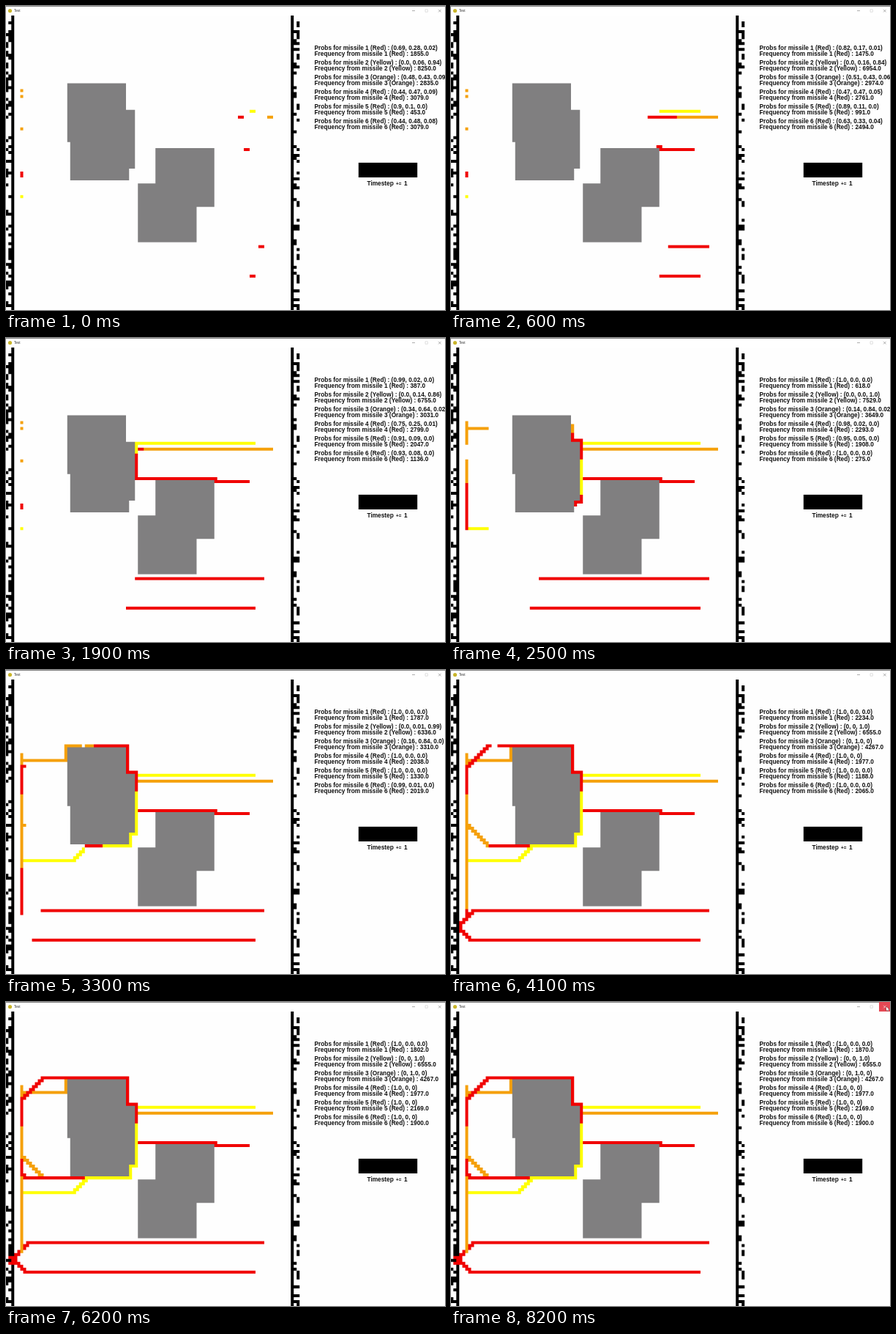
Animation, 600 px wide and 415 px high, one loop 8300 ms. Source, as an HTML page with a canvas:

```html
<!DOCTYPE html>
<html lang="en">
<head>
<meta charset="utf-8">
<title>Test</title>
<style>
html, body { margin: 0; width: 100%; height: 100%; overflow: hidden; background: #fff; }
canvas { display: block; }
</style>
</head>
<body>
<canvas id="stage" width="600" height="415"></canvas>
<script>
const ctx = document.getElementById('stage').getContext('2d');
const RED = '#f00000', YELLOW = '#ffff00', ORANGE = '#f5a00a', PAPER = '#fefefe';
const LOOP = 8300;

// The board is painted enlarged, then scaled down for soft edges without seams.
const ZOOM = 4;
const board = document.createElement('canvas');
board.width = 600 * ZOOM;
board.height = 415 * ZOOM;
const bctx = board.getContext('2d');

// Moves are letter groups with a repeat count; S stays in place.
const DIRS = { L: [-1, 0], R: [1, 0], U: [0, -1], D: [0, 1], S: [0, 0] };
function path(color, col, row, moves) {
  const cells = [[col, row]];
  for (const [, group, count] of moves.matchAll(/([A-Z]+)(\d+)/g))
    for (const step of group.repeat(count)) {
      col += DIRS[step][0];
      row += DIRS[step][1];
      cells.push([col, row]);
    }
  return { color, cells };
}

const interceptors = [
  path(RED, 5, 53, 'U24 R1 UR7'),
  path(ORANGE, 5, 25, 'D24 R1 DR7'),
  path(ORANGE, 5, 27, 'R15 U5 R5'),
  path(RED, 5, 54, 'D27'),
  path(ORANGE, 5, 38, 'D43'),
  path(YELLOW, 5, 61, 'R18 UR4 U1 R2'),
];
const missiles = [
  path(RED, 80, 34, 'L36 D18 L2 D4 L36 U1 L1 U5'),
  path(YELLOW, 84, 32, 'L40 D20 L2 D4 L12'),
  path(ORANGE, 90, 34, 'L46 U3 L3 U9 L15'),
  path(RED, 82, 45, 'L11 U1 L27 U13 L3 U9 L27'),
  path(RED, 87, 78, 'L80 DL4 D1 S7 D1 L1 D1 L1'),
  path(RED, 84, 88, 'L78 UL3 U1 S12 L1 U1 L1'),
];
const LAUNCH = 50, LAST = 105;

const blocks = [[21, 23], [24, 32], [22, 36], [51, 45], [45, 57]];

// Readouts at KEYS: frequency, plus the first two probabilities at the first four.
const KEYS = [0, 13, 25, 33, 41, 62, 82];
const readouts = [
  { name: 'Red', end: 99, freq: [1855, 855, 618, 1787, 2234, 1802, 1870],
    a: [.694, .97, 1, 1], b: [.284, .03, 0, 0], hit: [1, 0, 0] },
  { name: 'Yellow', end: 36, freq: [8250, 5559, 7529, 6336, 6555],
    a: [0, 0, 0, 0], b: [.06, .28, 0, .01], hit: [0, 0, 1] },
  { name: 'Orange', end: 34, freq: [2835, 2844, 3649, 3310, 4267],
    a: [.48, .54, .14, .16], b: [.43, .44, .84, .84], hit: [0, 1, 0] },
  { name: 'Red', end: 41, freq: [3079, 2964, 2293, 2038, 1977],
    a: [.44, .51, .98, 1], b: [.47, .48, .02, 0], hit: [1, 0, 0] },
  { name: 'Red', end: 50, freq: [453, 1913, 1908, 1330, 1188, 2169],
    a: [.9, .87, .95, 1], b: [.1, .13, .05, 0], hit: [1, 0, 0] },
  { name: 'Red', end: 50, freq: [3079, 2111, 275, 2019, 2065, 1900],
    a: [.44, .85, 1, .99], b: [.48, .15, 0, .01], hit: [1, 0, 0] },
];
const LATE_TICKS = [55, 57, 58, 59, 62, 63, 65, 68, 70, 72, 74, 75, 76, 78, 80, 81, 82];

const X = col => Math.round((col * 4.02 - 0.7) * ZOOM);
const Y = row => Math.round((13 + row * 4.02) * ZOOM);

function rand(n) {
  let h = Math.imul(n + 1, 0x9E3779B1);
  h = Math.imul(h ^ (h >>> 15), 0x85EBCA6B);
  h ^= h >>> 13;
  return (h >>> 0) / 4294967296;
}

function cells(color, col, row, w = 1, h = 1) {
  bctx.fillStyle = color;
  bctx.fillRect(X(col), Y(row), X(col + w) - X(col), Y(row + h) - Y(row));
}

function text(str, x, y, size, weight = 'bold') {
  ctx.font = `${weight} ${size}px "Liberation Sans", Arial, sans-serif`;
  ctx.fillText(str, x, y);
}

function stepsAt(tick) {
  if (tick <= 33) return Math.max(2, Math.floor(1.2 + 2.275 * tick));
  return Math.min(LAST, 76 + Math.floor((tick - 33) * 1.75));
}

function drawWalls() {
  cells('#000', 2, 0, 1, 101);
  cells('#000', 97, 0, 1, 101);
  for (let row = 0; row < 100; row++)
    [0, 1, 98, 99].forEach((col, i) => {
      if (rand(row * 4 + i) < 0.36) cells('#000', col, row);
    });
}

function drawTrails(steps) {
  const mark = ({ color, cells: list }, i) => {
    if (i < list.length) cells(color, ...list[i]);
  };
  for (let s = 1; s <= steps; s++) {
    for (const p of interceptors) mark(p, Math.max(0, s - LAUNCH - 1));
    for (const p of missiles) mark(p, s - 1);
  }
}

function drawBoard(steps) {
  bctx.fillStyle = PAPER;
  bctx.fillRect(0, 0, board.width, board.height);
  drawWalls();
  for (const [col, row] of blocks) cells('#807f80', col, row, 20, 20);
  drawTrails(steps);
  ctx.imageSmoothingQuality = 'high';
  ctx.drawImage(board, 0, 0, 600, 415);
}

const decimal = v => {
  const r = Math.round(v * 100) / 100;
  return Number.isInteger(r) ? r.toFixed(1) : String(r);
};

function readout(m, id, tick) {
  const lastFreq = m.freq[m.freq.length - 1];
  if (tick >= m.end) return [m.hit.map(v => v ? '1.0' : '0').join(', '), lastFreq];
  let k = 0;
  while (k < KEYS.length - 2 && tick >= KEYS[k + 1]) k++;
  const u = (tick - KEYS[k]) / (KEYS[k + 1] - KEYS[k]);
  const mix = (list, end) => {
    const from = list[k] ?? end, to = list[k + 1] ?? end;
    return from + (to - from) * u;
  };
  const a = mix(m.a, m.hit[0]), b = mix(m.b, m.hit[1]);
  const noise = (rand(tick * 7 + id) - 0.5) * 900 * Math.min(1, 6 * u * (1 - u));
  const freq = Math.round(Math.abs(mix(m.freq, lastFreq) + noise));
  return [[a, b, Math.max(0, 1 - a - b)].map(decimal).join(', '), freq];
}

function drawReadouts(tick) {
  const shown = tick < 55 ? tick : LATE_TICKS.filter(t => t <= tick).pop();
  ctx.fillStyle = '#111';
  readouts.forEach((m, i) => {
    const [probs, freq] = readout(m, i + 1, shown);
    const label = `missile ${i + 1} (${m.name}) : `;
    const y = 59.5 + i * 20.1;
    text(`Probs for ${label}(${probs})`, 421.5, y, 8.3);
    text(`Frequency from ${label}${freq}.0`, 421.5, y + 8, 8.3);
  });
  text('Timestep', 493.5, 244.5, 8.3);
  text('+=', 533, 244.5, 6.3);
  text('1', 544.1, 244.5, 8.3);
  ctx.fillStyle = '#000';
  ctx.fillRect(481.8, 213.9, 80.4, 20.1);
}

function line(color, ...points) {
  ctx.beginPath();
  for (const [x, y] of points) ctx.lineTo(x, y);
  ctx.strokeStyle = color;
  ctx.lineWidth = 0.6;
  ctx.stroke();
}

function drawCursor() {
  ctx.fillStyle = '#fff';
  line('#222', [595, 6.5], [595, 12], [596.3, 10.8], [597.2, 12.6],
    [598, 12.2], [597.2, 10.4], [599, 10.4], [595, 6.5]);
  ctx.fill();
}

function drawTitleBar(closing) {
  ctx.fillStyle = '#fff';
  ctx.fillRect(0, 0, 600, 13);
  ctx.fillStyle = '#888';
  ctx.fillRect(0, 0, 600, 1);
  ctx.fillStyle = '#c9b52c';
  ctx.beginPath();
  ctx.arc(5.5, 6.5, 2.6, 0, 7);
  ctx.fill();
  ctx.fillStyle = '#333';
  text('Test', 11, 8.3, 4.6, 'normal');
  if (closing) {
    ctx.fillStyle = '#e54854';
    ctx.fillRect(585, 0, 15, 13);
  }
  line('#777', [555, 6.5], [559, 6.5]);
  line('#ccc', [573, 4.8], [576.4, 4.8], [576.4, 8.2], [573, 8.2], [573, 4.8]);
  const cross = closing ? '#fff' : '#777';
  line(cross, [591, 4.8], [594.6, 8.4]);
  line(cross, [594.6, 4.8], [591, 8.4]);
  if (closing) drawCursor();
}

function draw(time) {
  const tick = Math.floor((time % LOOP) / 100);
  drawBoard(stepsAt(tick));
  drawReadouts(tick);
  drawTitleBar(tick >= 80);
}

const start = performance.now();
function loop() {
  draw(performance.now() - start);
  requestAnimationFrame(loop);
}
loop();
</script>
</body>
</html>
```
